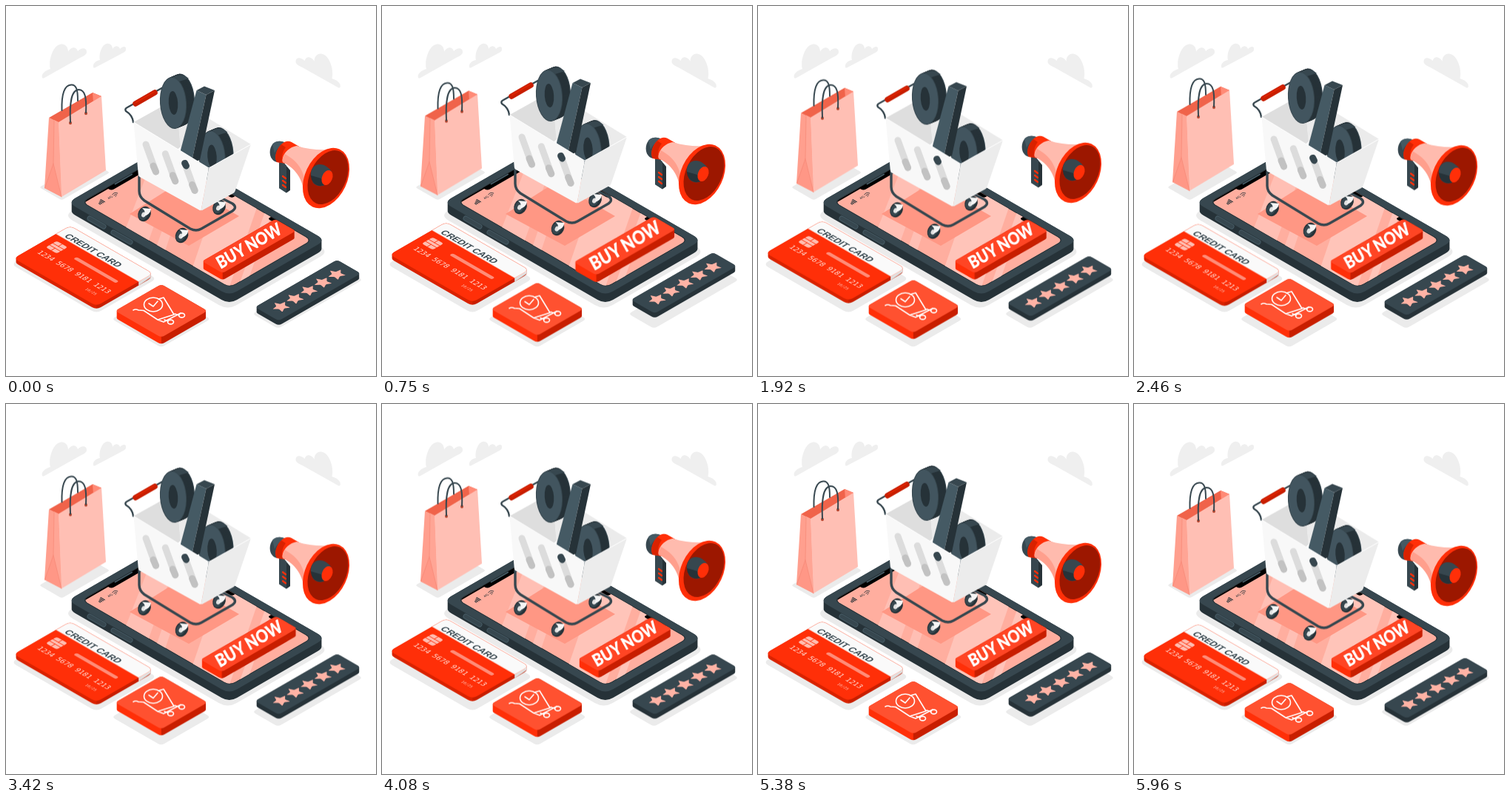
An HTML page for the animation above (6 s loop, 500 px wide and 500 px high).

```html
<!DOCTYPE html>
<html lang="en">
<head>
<meta charset="utf-8">
<title>Online shopping</title>
<style>
html, body { margin: 0; width: 100%; height: 100%; overflow: hidden; background: #fff; }
svg { display: block; width: 100vw; height: 100vh; }
#buy { transform-origin: 328.5px 330px; }
</style>
</head>
<body>
<svg id="stage" viewBox="0 0 500 500" xmlns="http://www.w3.org/2000/svg"></svg>
<script>
const RED = '#ff2f08', DEEP = '#c81e00', PINK = '#ffbdb1', SLATE = '#37474f', INK = '#263238', GREY = '#455a64';
const SANS = 'Lato, "Open Sans", sans-serif';
const MONO = '"DejaVu Sans Mono", monospace';
const C = Math.sqrt(3) / 2;

// a runs up-right, b runs down-right on the isometric floor
const iso = (x, y) => (a, b) => [x + C * (a + b), y + (b - a) / 2];
const quad = (x, y, u, v) => {
  const p = iso(x, y);
  return [p(0, 0), p(u, 0), p(u, v), p(0, v)];
};

function round(pts, r) {
  const toward = (p, q) => {
    const len = Math.hypot(q[0] - p[0], q[1] - p[1]);
    const k = Math.min(r, len / 2) / len;
    return [p[0] + (q[0] - p[0]) * k, p[1] + (q[1] - p[1]) * k];
  };
  const n = pts.length;
  return pts.map((p, i) => {
    const s = toward(p, pts[(i + n - 1) % n]), e = toward(p, pts[(i + 1) % n]);
    return `${i ? 'L' : 'M'}${s} Q${p} ${e}`;
  }).join(' ') + 'Z';
}

const path = (d, fill, more = '') => `<path d="${d}" fill="${fill}" ${more}/>`;
const poly = (pts, fill) => `<polygon points="${pts.join(' ')}" fill="${fill}"/>`;
const line = (d, color, w) =>
  `<path d="${d}" fill="none" stroke="${color}" stroke-width="${w}" stroke-linecap="round" stroke-linejoin="round"/>`;
const oval = (x, y, rx, ry, fill, turn = 0) =>
  `<ellipse cx="${x}" cy="${y}" rx="${rx}" ry="${ry}" fill="${fill}" transform="rotate(${turn} ${x} ${y})"/>`;
const text = (s, m, size, fill, weight, family) =>
  `<text transform="matrix(${m})" font-size="${size}" fill="${fill}" font-weight="${weight}" font-family='${family}'>${s}</text>`;
const group = (id, body) => `<g id="${id}">${body}</g>`;

let sides = 0;
function slab(x, y, u, v, r, depth, top, left, right) {
  const face = quad(x, y, u, v), [L, , R, B] = face;
  const drop = p => [p[0], p[1] + depth];
  const inset = C * r / 2; // how far a rounded side corner draws back
  const l = [L[0] + inset, L[1]], e = [R[0] - inset, R[1]];
  const body = round(face, r) + round(face.map(drop), r) + `M${l}L${e}L${drop(e)}L${drop(l)}Z`;
  const id = 'side' + sides++;
  return `<linearGradient id="${id}" gradientUnits="userSpaceOnUse" x1="${B[0] - 0.5}" x2="${B[0] + 0.5}" y1="0" y2="0">
    <stop offset="0" stop-color="${left}"/><stop offset="1" stop-color="${right}"/></linearGradient>` +
    path(body, `url(#${id})`) + path(round(face, r), top);
}
const shadow = (x, y, u, v, r) => path(round(quad(x, y, u, v), r), '#ebebeb');

function clouds() {
  const big = 'M49 97C47 92 53 87 60 85C57 74 63 54 73 52C80 50 84 56 84 62C86 56 95 53 97 61C102 56 109 56 109 62C109 66 104 68 100 70L52 97Q50 98 49 97Z';
  const small = 'M118 83C117 78 121 74 127 73C125 64 130 52 136 51C142 50 144 55 144 58C147 53 152 53 154 58C158 54 163 54 162 59C162 62 158 63 155 65L121 83Q119 84 118 83Z';
  return path(big, '#efefef') + path(small, '#efefef') +
    path(big, '#efefef', 'transform="translate(500.5 13) scale(-1 1)"');
}

function phone() {
  const at = iso(83.5, 265.5);
  const rect = (a, b, u, v, r, fill) => path(round([at(a, b), at(a + u, b), at(a + u, b + v), at(a, b + v)], r), fill);
  const screen = round([at(12, 11), at(139, 11), at(139, 241), at(12, 241)], 9);
  const bars = [0, 1, 2, 3].map(i =>
    line(`M${at(23 + i * 2.2, 28)} L${at(23 + i * 2.2, 25.5 - i * 1.3)}`, INK, 1.1)).join('');
  const [wx, wy] = at(46, 27);
  return slab(83.5, 265.5, 150, 252, 12, 11.5, SLATE, INK, INK) +
    line('M113 287L132 298M145 306L168 319', GREY, 7) +
    line('M113 287L132 298M145 306L168 319', SLATE, 5) +
    rect(11, 10, 129, 232, 10, INK) +
    `<clipPath id="screen"><path d="${screen}"/></clipPath>
    <g clip-path="url(#screen)">` + path(screen, '#ffae9f') +
    poly([[158, 310], [190, 325], [238, 190], [205, 190]], '#ffbfb4') +
    poly([[200, 335], [212, 340], [262, 190], [250, 190]], '#ffbfb4') +
    poly([[248, 365], [300, 385], [352, 235], [296, 225]], '#ffc4b9') +
    poly([[312, 385], [322, 385], [370, 250], [360, 250]], '#ffc4b9') +
    rect(8, 8, 134, 5, 2, '#000') + rect(50, 8, 60, 10, 4, '#000') +
    rect(134, 94, 8, 28, 3, '#000') + rect(134, 178, 8, 30, 3, '#000') + '</g>' +
    line(`M${at(62, 12)} L${at(88, 12)}`, GREY, 2) +
    bars + text('4G', [C, -0.5, C, 0.5, ...at(36.5, 28)], 4.8, INK, 600, SANS) +
    line(`M${wx - 3} ${wy - 1}Q${wx - 1} ${wy - 5} ${wx + 4} ${wy - 3}M${wx - 1} ${wy}Q${wx} ${wy - 2} ${wx + 3} ${wy - 1}`, INK, 0.9) +
    oval(wx + 1.5, wy + 1, 0.8, 0.6, INK) +
    poly([[167, 281], [247, 324], [315, 284], [235, 238]], '#ff9784');
}

const buyButton = () =>
  slab(265, 345, 114, 32, 4, 9.5, '#ff4524', RED, DEEP) +
  text('BUY NOW', [0.79, -0.46, 0.53, 0.95, 290, 356], 21.8, '#fff', 900, SANS);

function bag() {
  return poly([[58, 151], [117, 117], [129, 122], [71, 158]], '#f0634a') +
    poly([[117, 117], [129, 122], [129, 126], [118, 131]], '#ff8a76') +
    line('M75.5 141C75 122 78 107 88 106.500C95 106 97 113 97 128', SLATE, 2) +
    poly([[71, 157], [129, 122], [135, 222], [75, 258]], '#ffbfb4') +
    poly([[58, 151], [71, 157], [75, 258], [52, 246]], '#ff9f8e') +
    poly([[65, 154], [71, 157], [75, 258], [64, 215]], '#ffa595') +
    poly([[64, 213], [75, 258], [52, 246]], '#ff9786') +
    line('M65 155L64 213L52.5 246M64 213L75 258', '#f58572', 0.6) +
    oval(87, 158, 2, 2.3, '#b5462f') + oval(108, 145, 2, 2.3, '#b5462f') +
    line('M87 157C86 135 87 114 98 113C107 113 109 124 108 144', SLATE, 2);
}

function card() {
  const at = iso(10.5, 341);
  const strip = [at(66, 0), at(88, 0), at(88, 129), at(66, 129)];
  const [, T, R] = quad(10.5, 341, 88, 129);
  const down = [C, 0.5, -C, 0.5];
  const box = (a, b, u, v, r, fill) => path(round([at(a, b), at(a + u, b), at(a + u, b + v), at(a, b + v)], r), fill);
  const low = p => [p[0], p[1] + 5];
  const edge = [1.5, 3, 4.5].map(d => `M${strip[3][0]} ${strip[3][1] + d}L${R[0] - 4} ${R[1] + d + 2}`).join('');
  return slab(10.5, 341, 88, 129, 7, 5, RED, '#d92200', DEEP) +
    poly([strip[3], [R[0] - 3, R[1]], [R[0] - 3, R[1] + 5], low(strip[3])], '#ececec') + line(edge, '#cfcfcf', 0.6) +
    path(`M${strip[0]} L${at(81, 0)} Q${T} ${at(88, 7)} L${at(88, 122)} Q${R} ${at(81, 129)} L${strip[3]}Z`,
      '#fafafa', 'stroke="#ffb3a5" stroke-width=".7"') +
    text('CREDIT CARD', [...down, ...at(68.5, 9.5)], 12.2, SLATE, 700, '"Liberation Sans", Arial, sans-serif') +
    box(40, 10, 17, 17, 3, PINK) +
    line(`M${at(46, 10)} L${at(46, 27)}M${at(51, 10)} L${at(51, 27)}M${at(40, 18.5)} L${at(46, 18.5)}M${at(51, 18.5)} L${at(57, 18.5)}`, RED, 0.9) +
    box(46, 47, 5, 66, 2.5, '#ff8c78') +
    text('1234 5678 9181 1213', [...down, ...at(25.5, 10)], 9.7, '#ffe3dd', 400, MONO) +
    text('10/25', [...down, ...at(13.5, 97)], 5.4, '#ffc9bf', 400, MONO);
}

function cartButton() {
  const icon = 'M172 411Q175 409 179 411L186 411.5L205 424L227 417L213 394L206 396' +
    'M205 424L213 427L236 415M214 424L219 426M228 416L234 418' +
    'M193 402L199 406L205 399';
  return slab(147.5, 412, 72, 72, 5, 9.5, '#ff5130', RED, DEEP) + line(icon, '#fff', 1.6) +
    `<g fill="none" stroke="#fff" stroke-width="1.6"><ellipse cx="199" cy="403.5" rx="12.5" ry="9.5"/>
    <ellipse cx="222.5" cy="427" rx="4" ry="2.9"/><ellipse cx="237.5" cy="418" rx="4" ry="2.9"/></g>`;
}

function rating() {
  let out = slab(336.5, 407, 128, 37, 5, 6.5, SLATE, INK, INK);
  for (let i = 0; i < 5; i++) {
    const at = iso(371.5 + i * 18.8, 406.3 - i * 10.9);
    const star = Array.from({ length: 10 }, (_, k) => {
      const r = k % 2 ? 5 : 10.4, t = k * Math.PI / 5;
      return at(r * Math.sin(t), -r * Math.cos(t));
    });
    out += path(round(star, 1.2), '#ffb3a5');
  }
  return out;
}

function megaphone() {
  return path('M369 205L379 216L384 222V249L379 252.5L369 246Z', INK) +
    path('M369 205L379 216V252.5L369 246Z', SLATE) +
    line('M374 230L378 233M374 236L378 239M374 242L378 245', RED, 2.2) +
    path('M366 211C356 209 354 195 360 187C365 181 374 182 380 186L372 210Z', SLATE) +
    path('M360 187C365 181 374 182 380 186L376 190C370 188 366 193 363 199Z', GREY) +
    path('M366 211C362 205 365 194 372 187C377 182 382 182 386 184L398 191L378 213Z', RED) +
    path('M366 211C362 205 365 194 372 187L378 191C373 197 372 206 374 212Z', '#d92200') +
    path('M374 211C372 203 380 191 393 189C412 195 430 195 447 193L420 272C404 268 402 258 402 248C399 229 386 216 374 211Z', '#ffbbae') +
    path('M374 211C373 207 375 203 377 200C394 210 407 222 406 262C402 258 402 252 402 246C399 229 386 216 374 211Z', '#ff9f8d') +
    oval(432.5, 232.5, 28.5, 43, RED, 25) + oval(435, 231.5, 24.5, 38.5, '#9c1700', 25) +
    path('M412 229C411 221 416 214 424 214C431 214 437 219 440 224L430 242C425 245 419 243 415 239Z', SLATE) +
    path('M412 229C412 236 417 243 425 243L430 242L426 233Z', INK) +
    oval(434, 232, 7, 10.5, RED, 22);
}

function zero(x, y) {
  let side = '';
  for (let i = 11; i > 0; i--) side += oval(x + i, y - i * 0.42, 18, 35, i > 10 ? SLATE : INK, -4);
  return side + path(`M${x - 9} ${y - 31}L${x + 2} ${y - 36.5}Q${x + 12} ${y - 41} ${x + 21} ${y - 33}L${x + 8} ${y - 29}Z`, SLATE) +
    oval(x, y, 18, 35, SLATE, -4) + oval(x, y, 17, 34, '#42555f', -4) +
    oval(x, y, 6.2, 16, INK, -4);
}

const wheel = (x, y) =>
  oval(x, y, 8.5, 10.5, INK, 25) + oval(x - 1.5, y + 0.5, 6, 8, SLATE, 25) + oval(x - 1, y + 1, 2.8, 3.6, '#e0e0e0', 25) +
  path(`M${x - 3} ${y - 8}L${x + 9} ${y - 7}Q${x + 8} ${y + 1} ${x - 1} ${y + 3}Q${x + 3} ${y - 3} ${x - 3} ${y - 8}Z`, '#f5f5f5');

function cart() {
  const L = [172.5, 157], T = [230, 125], R = [331, 187], F = [274, 219];
  const slot = i => {
    const x = 189 + i * 26.3, y = 187 + i * 12.7;
    return line(`M${x} ${y}L${x + 13.5} ${y + 37}`, '#dcdcdc', 9) +
      line(`M${x + 10} ${y + 29}L${x + 13.5} ${y + 37}`, '#c2c2c2', 9);
  };
  return wheel(288, 272) + wheel(187, 281) + wheel(237.5, 310) +
    line('M180 230V250Q180 258 187 263L249 301Q257 305 264 301L306 277Q313 272 306 267L276 252', SLATE, 3.4) +
    line('M172 157C171 149 167 145 162 142Q160 139 164 137L214 109', SLATE, 2.4) +
    line('M175 132L201 117', DEEP, 7.5) + line('M176 130L200 116', '#e02500', 2) +
    poly([L, T, [236, 190], [225, 200]], '#dedede') + poly([T, R, F, [236, 195]], '#ebebeb') +
    zero(226, 131) +
    zero(278.5, 203.5) +
    poly([[257.5, 114], [270.5, 120], [250.5, 212], [233.5, 204]], GREY) +
    poly([[270.5, 120], [282, 114], [262, 208], [250.5, 212]], INK) +
    poly([[257.5, 114], [268, 108.5], [282, 114], [270.5, 120]], SLATE) +
    path(round([L, F, [263.5, 277], [179, 230]], 2), '#f8f8f8') +
    path(round([F, R, [309, 252], [263.5, 277]], 2), '#ececec') +
    line(`M${L} L${F} L${R}`, '#fff', 1) +
    [0, 1, 2].map(slot).join('') + line('M241.6 212.4L243.5 216', SLATE, 9);
}

document.getElementById('stage').innerHTML =
  clouds() +
  shadow(45, 245, 75, 35, 3) +
  shadow(78, 283, 158, 256, 14) +
  shadow(7, 349, 94, 133, 8) +
  shadow(143, 423, 77, 77, 5) +
  shadow(333, 416, 132, 40, 5) +
  phone() +
  group('buy', buyButton()) +
  group('cart', cart()) +
  group('bag', bag()) +
  group('card', card()) +
  group('tile', cartButton()) +
  group('rating', rating()) +
  group('horn', megaphone());

const floatTime = { cart: 1500, rating: 1500, horn: 3000, card: 3000, bag: 6000, tile: 6000 };
const play = (id, frames, duration) =>
  document.getElementById(id).animate(frames, { duration, iterations: Infinity }).startTime = 0;

for (const [id, ms] of Object.entries(floatTime)) {
  play(id, [0, -10, 0].map(y => ({ transform: `translateY(${y}px)` })), ms);
}
const beat = [[0, 1], [0.1, 1.1], [0.3, 1], [0.4, 1], [0.5, 1.1], [0.6, 1], [1, 1]];
play('buy', beat.map(([offset, s]) => ({ offset, transform: `scale(${s})` })), 6000);
</script>
</body>
</html>
```
